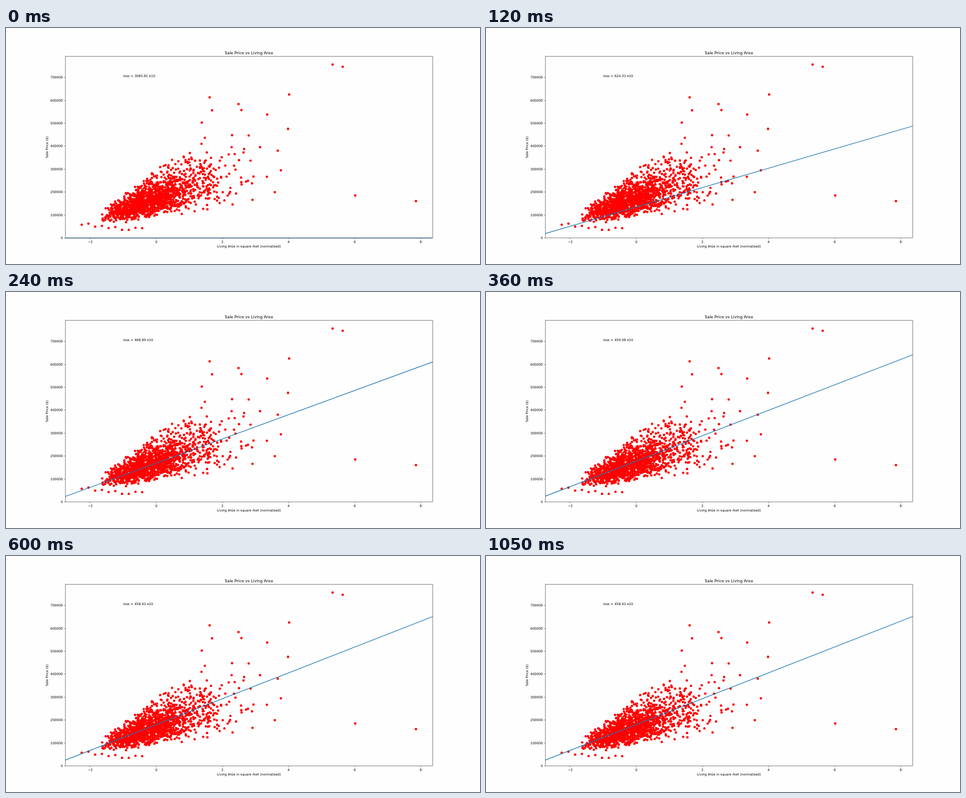
An HTML page with a canvas that plays this animation: 1058 by 529 pixels, repeating every 9790 ms.

```html
<!DOCTYPE html>
<html lang="en">
<head>
<meta charset="utf-8">
<title>Sale Price vs Living Area</title>
<style>
  html, body { margin: 0; height: 100%; overflow: hidden; background: #fefefe; }
  canvas { display: block; }
</style>
</head>
<body>
<canvas width="1058" height="529"></canvas>
<script>
const ctx = document.querySelector('canvas').getContext('2d');
const LOOP = 9790, STEP = 30, LAST_STEP = 35;
const LEFT = 132.25, RIGHT = 952.25, BOTTOM = 470.8;
const PT = 52.9 / 72, RADIUS = 2.65;

const toX = u => 335.5 + 73.8 * u;
const toY = price => BOTTOM - price * 0.0005146;

let seed = 20;
function random() {
  seed = (seed * 1664525 + 1013904223) % 4294967296;
  return (seed + 0.5) / 4294967296;
}
const normal = () => Math.sqrt(-2 * Math.log(random())) * Math.cos(2 * Math.PI * random());

const dots = new Path2D();
function addDot(x, y) {
  dots.moveTo(x + RADIUS, y);
  dots.arc(x, y, RADIUS, 0, 2 * Math.PI);
}

// The most striking lone houses
[[729, 82], [751.5, 87], [632, 149], [454.5, 155.5], [519, 170.5], [525.5, 184],
 [460, 184.5], [583, 194], [437, 212], [629.5, 226], [606.5, 275], [613.5, 319],
 [600, 368], [779.5, 375.5], [915, 388]].forEach(p => addDot(...p));

// A few cheap strays below the cloud
for (let x = 169; x < 310; x += 15) addDot(x, 437 + 16 * random());

// Log-normal areas and prices, kept inside the outline of the cloud
for (let n = 0; n < 1430;) {
  const u = (Math.exp(7.275 + 0.315 * normal()) - 1515) / 525;
  const spread = 0.24 + 0.025 * u;
  const price = (175000 + 50000 * u) * Math.exp(spread * normal());
  const x = toX(u), y = toY(price);
  const top = Math.max(230, 408 - 0.76 * (x - 217));
  const bottom = Math.min(436, 490 - 0.18 * x);
  if (u < -1.72 || u > 3.4 || y < top || y > bottom) continue;
  addDot(x, y);
  n++;
}

function text(s, x, y, align = 'center', size = 10) {
  ctx.font = `${size * PT}px "DejaVu Sans", sans-serif`;
  ctx.textAlign = align;
  ctx.fillStyle = '#000';
  ctx.fillText(s, x, y);
}

function segment(x1, y1, x2, y2) {
  ctx.beginPath();
  ctx.moveTo(x1, y1);
  ctx.lineTo(x2, y2);
  ctx.stroke();
}

const snap = v => Math.floor(v) + 0.5;

function drawAxes() {
  ctx.strokeStyle = '#000';
  ctx.lineWidth = 0.8 * PT;
  ctx.strokeRect(132.5, 63.5, 820, 407);
  for (let u = -2; u <= 8; u += 2) {
    const x = snap(toX(u));
    segment(x, 471, x, 473.5);
    text(String(u).replace('-', '\u2212'), toX(u), 482);
  }
  for (let price = 0; price <= 700000; price += 100000) {
    const y = snap(toY(price));
    segment(129.5, y, 132, y);
    text(price, 127, toY(price) + 2.5, 'right');
  }
  text('Sale Price vs Living Area', 542, 59.3, 'center', 12);
  text('Living Area in square feet (normalised)', 542.2, 492);
  ctx.save();
  ctx.translate(94.3, 267.3);
  ctx.rotate(-Math.PI / 2);
  text('Sale Price ($)', 0, 0);
  ctx.restore();
}

// Gradient descent: the error of the fit shrinks by a fixed factor per step
function draw(now) {
  const step = Math.min(LAST_STEP, Math.floor(now % LOOP / STEP));
  const error = Math.pow(0.063148, step / 8);
  const fit = u => (180921 + 56294 * u) * (1 - error);
  const loss = 458.416 + 2627.394 * error * error;

  ctx.fillStyle = '#fefefe';
  ctx.fillRect(0, 0, 1058, 529);
  ctx.fillStyle = '#f00';
  ctx.fill(dots);

  ctx.strokeStyle = '#1f77b4';
  ctx.lineWidth = 2 * PT;
  segment(LEFT, toY(fit(-2.754)), RIGHT, toY(fit(8.357)));

  drawAxes();
  text(`loss = ${loss.toFixed(2)} e10`, toX(-1), 110, 'left');
}

const start = performance.now();
function tick() {
  draw(performance.now() - start);
  requestAnimationFrame(tick);
}
tick();
</script>
</body>
</html>
```
